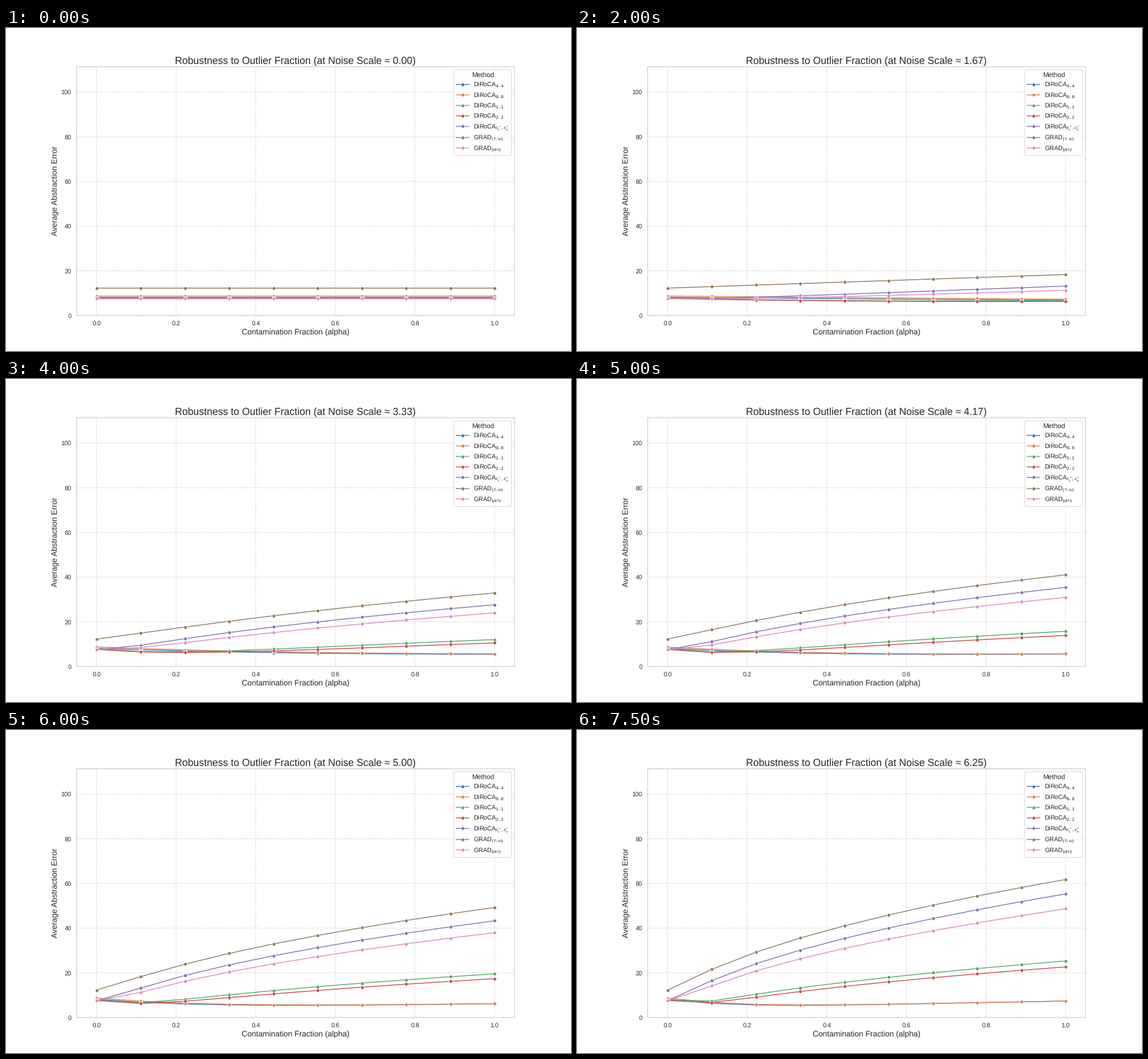
Recreate the animation shown at these times as a matplotlib script. Size 990 by 566 pixels, loop 8 s.

```python
import numpy as np
import matplotlib.pyplot as plt
from matplotlib.animation import FuncAnimation

W, H = 990, 566
DPI = W / 14
FRAMES, INTERVAL = 16, 500
NOISE_STEP = 10 / 24   # noise scale gained per frame
BEND = 1.25            # noise level where errors turn from flat to linear

INK, GREY = "0.15", "0.8"
plt.rcParams.update({
    "font.family": ["Liberation Sans", "DejaVu Sans"],
    "font.size": 12,
    "text.color": INK,
    "text.hinting": "none",
    "path.snap": False,
    "axes.labelcolor": INK,
    "axes.edgecolor": GREY,
    "axes.linewidth": 1.25,
    "axes.axisbelow": True,
    "xtick.color": INK,
    "ytick.color": INK,
    "xtick.labelsize": 11,
    "ytick.labelsize": 11,
    "xtick.major.size": 6,
    "ytick.major.size": 6,
    "xtick.bottom": False,
    "ytick.left": False,
    "legend.fontsize": 11,
    "legend.title_fontsize": 12,
    "legend.labelspacing": 0.36,
})

# label, colour, (start error, growth per noise unit, dip depth, dip reach)
METHODS = [
    (r"DiRoCA$_{4,4}$", "#4C72B0", (8.1, 1.08, 6.3, 6.6)),
    (r"DiRoCA$_{8,8}$", "#DD8452", (8.7, 1.08, 6.9, 6.9)),
    (r"DiRoCA$_{1,1}$", "#55A868", (7.85, 4.72, 6.73, 1.91)),
    (r"DiRoCA$_{2,2}$", "#C44E52", (7.6, 4.32, 7.1, 2.33)),
    (r"DiRoCA$_{\varepsilon_\ell^*, \varepsilon_h^*}$", "#8172B3",
     (7.5, 9.84, 2.6, 0.7)),
    (r"GRAD$_{(\tau, \omega)}$", "#937860", (12.25, 10.26, 3.03, 1.6)),
    (r"GRAD$_{\mathrm{bary}}$", "#DA8BC3", (7.5, 8.76, 3.73, 0.94)),
]

ALPHA = np.linspace(0, 1, 10)


def errors(noise, start, growth, dip, reach):
    """Hyperbolic growth less a saturating dip, both in alpha * noise**2."""
    power = ALPHA * noise**2
    rise = growth * (np.sqrt(BEND**2 + power) - BEND)
    return start + rise - dip * (1 - np.exp(-power / reach))


# the tiny margin keeps the pixel size from rounding down
fig = plt.figure(figsize=((W + 1e-6) / DPI, (H + 1e-6) / DPI), dpi=DPI,
                 facecolor="white")
ax = fig.add_axes([0.125, 0.11, 0.775, 0.77])
ax.set(xlim=(-0.05, 1.05), ylim=(0, 111.35))
ax.grid(True, color=GREY, linestyle="--", linewidth=1, alpha=0.8)
ax.set_xlabel("Contamination Fraction (alpha)", fontsize=14)
ax.set_ylabel("Average Abstraction Error", fontsize=14)
title = ax.set_title("", fontsize=18)

lines = [
    ax.plot(ALPHA, errors(0, *shape), color=color, label=label, lw=1.5,
            marker="o", ms=6, mec="white", mew=0.75)[0]
    for label, color, shape in METHODS
]
ax.legend(title="Method", loc="upper right", edgecolor=GREY)


def update(frame):
    noise = frame * NOISE_STEP
    title.set_text(f"Robustness to Outlier Fraction (at Noise Scale ≈ {noise:.2f})")
    for line, (_, _, shape) in zip(lines, METHODS):
        line.set_ydata(errors(noise, *shape))
    return [title, *lines]


anim = FuncAnimation(fig, update, frames=FRAMES, interval=INTERVAL,
                     init_func=lambda: update(0), repeat=True, repeat_delay=0)
plt.show()
```
